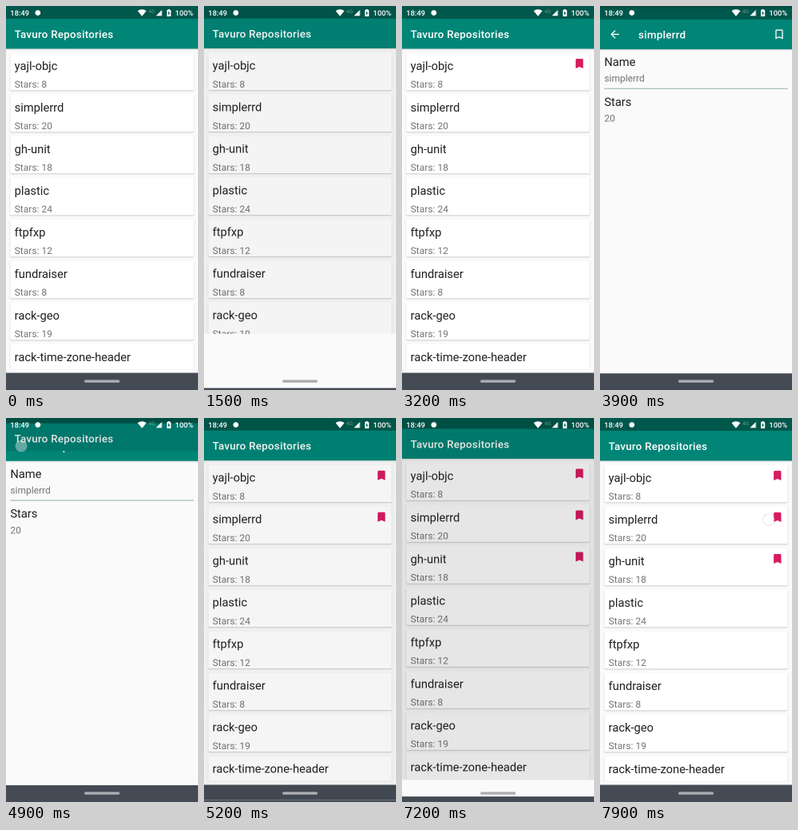
An HTML page with a canvas for the animation above (8000 ms loop, 240x480 px).

```html
<!DOCTYPE html>
<html lang="en">
<head>
<meta charset="utf-8">
<title>Repository bookmarks</title>
<style>
  html, body { margin: 0; width: 240px; height: 480px; overflow: hidden; background: #fafafa; }
  canvas { display: block; width: 240px; height: 480px; }
</style>
</head>
<body>
<canvas id="stage" width="480" height="960"></canvas>
<script>
const W = 240, H = 480, LOOP = 8000, SLIDE = 425;
const NAV_TOP = 458.67, BAR_BOTTOM = 53.33;
const ctx = document.getElementById('stage').getContext('2d');
ctx.scale(2, 2); // drawn at double size for soft subpixel positions

const repos = [
  ['yajl-objc', 8], ['simplerrd', 20], ['gh-unit', 18], ['plastic', 24],
  ['ftpfxp', 12], ['fundraiser', 8], ['rack-geo', 19], ['rack-time-zone-header', 6],
];

// Each visit opens one repository, saves it and goes back.
const visits = [
  { open: 1450, save: 2200, close: 2770 },
  { open: 3580, save: 4300, close: 4860 },
  { open: 5670, save: 6390, close: 7000 },
];

// Finger dots: x, y, start, end
const touches = [
  [205, 85, 1300, 1480], [225, 23, 2100, 2290], [19, 35, 2710, 2890],
  [205, 137, 3300, 3610], [223, 43, 4200, 4490], [19, 35, 4800, 4950],
  [205, 189, 5600, 5710], [231, 30, 6300, 6590], [19, 35, 6900, 7090],
  [211, 127, 7700, 8000],
];

const BOOKMARK = 'M17 3H7C5.9 3 5 3.9 5 5V21L12 18L19 21V5C19 3.9 18.1 3 17 3Z';
const icons = {
  saved: new Path2D(BOOKMARK),
  unsaved: new Path2D(BOOKMARK + 'M17 18L12 15.8L7 18V5H17Z'),
  back: new Path2D('M20 11H7.8L13.4 5.4L12 4L4 12L12 20L13.4 18.6L7.8 13H20Z'),
};

const clamp = v => Math.min(1, Math.max(0, v));

// y at x on the Bézier curve through four points
function bezier(x, ...points) {
  const at = (s, axis) => {
    const r = 1 - s, [a, b, c, d] = points.map(p => p[axis]);
    return r ** 3 * a + 3 * r * r * s * b + 3 * r * s * s * c + s ** 3 * d;
  };
  let lo = 0, hi = 1;
  for (let i = 0; i < 16; i++) {
    const mid = (lo + hi) / 2;
    if (at(mid, 0) < x) lo = mid; else hi = mid;
  }
  return at(hi, 1);
}

const slideEase = x => bezier(x, [0, 0], [0.4, 0], [0.2, 1], [1, 1]);
const revealEase = x => x < 1 / 6
  ? bezier(x, [0, 0], [0.05, 0], [0.1333, 0.06], [1 / 6, 0.4])
  : bezier(x, [1 / 6, 0.4], [0.2083, 0.82], [0.25, 1], [1, 1]);

function rect(x, y, w, h, color, radius = 0) {
  ctx.fillStyle = color;
  ctx.beginPath();
  ctx.roundRect(x, y, w, h, radius);
  ctx.fill();
}

function polygon(color, ...points) {
  ctx.fillStyle = color;
  ctx.beginPath();
  points.forEach(([x, y]) => ctx.lineTo(x, y));
  ctx.fill();
}

function text(str, x, y, size, color, weight = 400, spacing = 0) {
  ctx.font = `${weight} ${size}px Roboto, sans-serif`;
  ctx.letterSpacing = spacing + 'px';
  ctx.fillStyle = color;
  ctx.fillText(str, x, y);
}

const heading = (str, x, y) => text(str, x, y, 14.67, '#212121');
const caption = (str, x, y) => text(str, x, y, 12, '#757575');

function icon(name, x, y, color) {
  ctx.save();
  ctx.translate(x, y);
  ctx.scale(2 / 3, 2 / 3);
  ctx.fillStyle = color;
  ctx.fill(icons[name], 'evenodd');
  ctx.restore();
}

function windowFrame(title, x) {
  rect(0, BAR_BOTTOM, W, NAV_TOP - BAR_BOTTOM, '#fafafa');
  const shade = ctx.createLinearGradient(0, 53, 0, 56);
  shade.addColorStop(0, 'rgba(0,0,0,.12)');
  shade.addColorStop(1, 'rgba(0,0,0,0)');
  rect(0, 53, W, 3, shade);
  rect(0, 0, W, BAR_BOTTOM, '#008577');
  rect(0, 0, W, 16, '#00574b');
  rect(0, NAV_TOP, W, H - NAV_TOP, '#454b54');
  text(title, x, 39.8, 13.33, '#fff', 500, 0.28);
}

function drawList(time) {
  windowFrame('Tavuro Repositories', 10.67);
  ctx.save();
  ctx.beginPath();
  ctx.rect(0, 55, W, 398.5);
  ctx.clip();
  repos.forEach(([name, stars], i) => {
    const y = 58.67 + 52 * i;
    ctx.save();
    ctx.shadowColor = 'rgba(0,0,0,.24)';
    ctx.shadowBlur = 3;
    ctx.shadowOffsetY = 1.6;
    rect(5.33, y, 229.33, 46.67, '#fff', 1.33);
    ctx.restore();
    heading(name, 10.67, y + 21.3);
    caption('Stars: ' + stars, 10.67, y + 43.5);
    if (visits[i] && time >= visits[i].save) icon('saved', 213.8, y + 5.33, '#d81b60');
  });
  ctx.restore();
}

function drawDetail([name, stars], saved) {
  windowFrame(name, 48);
  icon('back', 10.67, 26.67, '#fff');
  icon(saved ? 'saved' : 'unsaved', 216, 26.67, '#fff');
  heading('Name', 5.33, 74.3);
  caption(name, 5.33, 93.9);
  rect(5.33, 102, 229.33, 1, '#93ada8');
  heading('Stars', 5.33, 124);
  caption(stars, 5.33, 143.8);
}

function drawSystem() {
  text('18:49', 5.3, 12, 9.33, '#fff', 500);
  ctx.beginPath();
  ctx.arc(39.8, 8.5, 3.4, 0, 7);
  ctx.fill();
  // Wi-Fi fan
  ctx.beginPath();
  ctx.moveTo(170, 12.7);
  ctx.arc(170, 12.7, 8.4, -2.27, -0.87);
  ctx.fill();
  text('4G', 178, 9, 6.5, 'rgba(255,255,255,.4)');
  polygon('rgba(255,255,255,.3)', [187.5, 12.3], [195.5, 4.3], [195.5, 12.3]);
  polygon('#fff', [187.5, 12.3], [194.5, 5.3], [194.5, 12.3]);
  // Charging battery
  rect(202.4, 4, 2.4, 2, '#fff');
  rect(201, 5, 5.2, 8, '#fff', 0.6);
  polygon('#00574b', [204, 6.2], [202, 9.4], [203.3, 9.4], [203.2, 11.8], [205.2, 8.6], [204, 8.6]);
  text('100%', 211.4, 12, 9.33, '#fff', 500);
  rect(98, 467.4, 44, 3.4, '#abaeb1', 1.7);
}

function drawTouches(time) {
  for (const [x, y, start, end] of touches) {
    if (time < start || time >= end) continue;
    ctx.beginPath();
    ctx.arc(x, y, 7.3, 0, 7);
    ctx.fillStyle = 'rgba(255,255,255,.38)';
    ctx.strokeStyle = 'rgba(150,150,150,.22)';
    ctx.lineWidth = 1;
    ctx.fill();
    ctx.stroke();
  }
}

function draw(time) {
  const index = visits.findIndex(v => time >= v.open && time < v.close + SLIDE);
  const visit = visits[index];
  let slid = 0, revealed = 0, dim = 0;
  if (visit) {
    const closing = time >= visit.close;
    const since = time - (closing ? visit.close : visit.open);
    const progress = clamp(since / SLIDE);
    const toward = v => closing ? 1 - v : v;
    slid = toward(slideEase(progress));
    revealed = toward(revealEase(progress));
    dim = 0.1 * toward(clamp(closing ? (since - 200) / 225 : since / 117));
  }

  ctx.save();
  ctx.translate(0, -0.02 * H * slid);
  drawList(time);
  ctx.restore();

  if (visit) {
    rect(0, 0, W, H, `rgba(0,0,0,${dim})`);
    // The detail window slides up while its top edge is uncovered
    ctx.save();
    ctx.beginPath();
    ctx.rect(0, H * (1 - revealed), W, H);
    ctx.clip();
    ctx.translate(0, 0.041 * H * (1 - slid));
    drawDetail(repos[index], time >= visit.save);
    ctx.restore();
  }
  drawSystem();
  drawTouches(time);
}

function tick() {
  draw(performance.now() % LOOP);
  requestAnimationFrame(tick);
}
tick();
</script>
</body>
</html>
```
